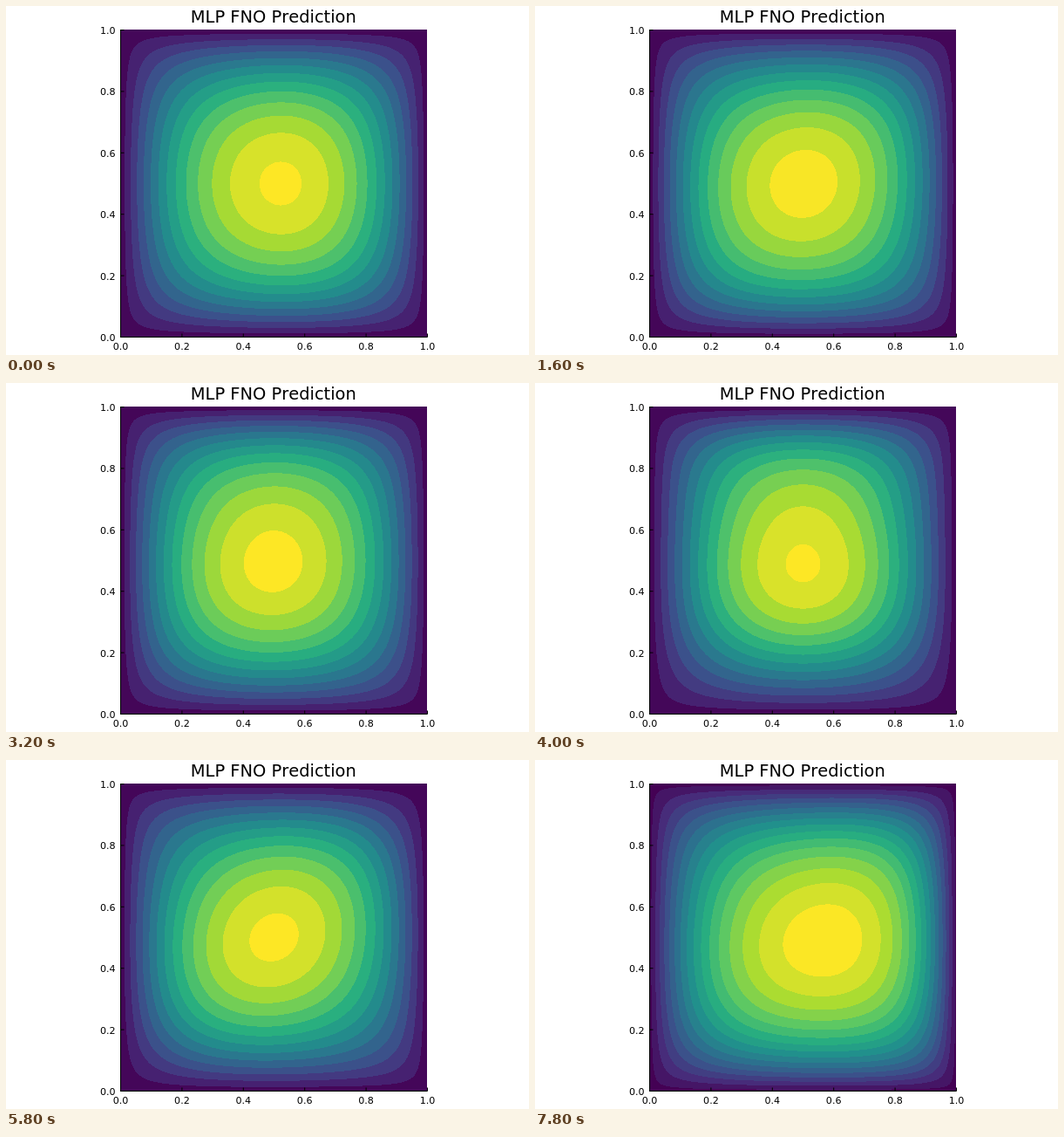
An HTML page with a canvas for the animation above (8000 ms loop, 600 by 400 pixels).

```html
<!DOCTYPE html>
<html lang="en">
<head>
<meta charset="utf-8">
<style>
  html, body { margin: 0; width: 100%; height: 100%; overflow: hidden; background: #fff; }
  canvas { display: block; }
</style>
</head>
<body>
<canvas id="stage" width="600" height="400"></canvas>
<script>
const ctx = document.getElementById('stage').getContext('2d');
const SIZE = 352, HALF = SIZE / 2, LEFT = 131, TOP = 27;
const LOOP = 8000, STEP = 200;

const gradient = ['#440154', '#472d7b', '#3b528b', '#2c728e', '#21918c', '#28ae80', '#5ec962', '#addc30', '#fde725'];

// gap: contour spacing; slope, bend and skew: linear, quadratic and cubic change along an axis;
// tilt: stretch along the diagonal. Anything left out is zero.
const poses = [
  { time: 0, gap: .0771, slopeX: .08, bendX: -.04, skewX: -.06 },
  { time: 800, gap: .0762, slopeX: .04, bendX: -.04, skewX: -.06, tilt: .1 },
  { time: 2400, gap: .0744, slopeX: -.02, bendX: .08, bendY: .05, skewY: -.09, tilt: .1 },
  { time: 4000, gap: .0773, slopeY: -.04, bendX: -.18, bendY: .03, skewY: .38 },
  { time: 5800, gap: .0766, bendX: -.04, bendY: -.08, skewY: .05, tilt: .27 },
  { time: 7000, gap: .0755, slopeX: -.06, slopeY: -.05, bendY: .05, skewX: .05, tilt: -.42 },
  { time: 7800, gap: .0626, slopeX: .16, slopeY: -.05, bendX: .3, bendY: .13, skewX: .08, skewY: .05, tilt: .1 }
];

const coord = i => (i - HALF) / HALF;
const mix = (a, b, t) => a + (b - a) * t;
const cubic = q => q ** 3 * (2 - 1.5 * q * q);
const channels = hex => [1, 3, 5].map(i => parseInt(hex.slice(i, i + 2), 16));

// Solution of Poisson's equation on the square, scaled to about 1 at the centre.
function poissonField() {
  const modes = Array.from({ length: 7 }, (_, n) => 2 * n + 1);
  const across = [], up = [];
  for (let i = 0; i < SIZE; i++) {
    const q = coord(i) * Math.PI / 2;
    across.push(modes.map((k, n) => (-1) ** n * Math.cos(k * q) / k ** 3));
    up.push(modes.map(k => Math.cosh(k * q) / Math.cosh(k * Math.PI / 2)));
  }
  const scale = 1.6968;
  const field = new Float32Array(SIZE * SIZE);
  for (let j = 0, p = 0; j < SIZE; j++) {
    for (let i = 0; i < SIZE; i++, p++) {
      const series = modes.reduce((sum, _, n) => sum + across[i][n] * up[j][n], 0);
      field[p] = Math.max(0, scale * (1 - coord(i) ** 2 - 32 / Math.PI ** 3 * series));
    }
  }
  return field;
}

const base = poissonField();
const image = ctx.createImageData(SIZE, SIZE);
image.data.fill(255);

function colorAt(value) {
  const last = gradient.length - 1;
  const p = Math.min(1, Math.max(0, value)) * last;
  const i = Math.min(last - 1, Math.floor(p));
  const from = channels(gradient[i]), to = channels(gradient[i + 1]);
  return from.map((c, n) => mix(c, to[n], p - i));
}

function poseAt(time) {
  const next = Math.max(1, poses.findIndex(pose => pose.time >= time));
  const a = poses[next - 1], b = poses[next];
  const t = (time - a.time) / (b.time - a.time);
  return name => mix(a[name] || 0, b[name] || 0, t);
}

function profile(pose, axis) {
  const slope = pose('slope' + axis), bend = pose('bend' + axis), skew = pose('skew' + axis);
  return Array.from({ length: SIZE }, (_, i) => {
    const q = axis === 'Y' ? -coord(i) : coord(i);
    return slope * q + bend * q * q + skew * cubic(q);
  });
}

function drawContours(time) {
  const pose = poseAt(time);
  const gap = pose('gap'), tilt = pose('tilt');
  const lowest = 1.9 * gap - .092;
  const colors = Array.from({ length: 24 }, (_, k) => colorAt(lowest + (k - .5) * gap));
  const columns = profile(pose, 'X'), rows = profile(pose, 'Y');
  for (let j = 0, p = 0; j < SIZE; j++) {
    const y = -coord(j);
    for (let i = 0; i < SIZE; i++, p++) {
      const x = coord(i);
      const diagonal = tilt * x * y * (1 - x * x - y * y);
      const value = base[p] * (.995 + columns[i] + rows[j] + diagonal);
      const band = Math.max(0, Math.floor((value - lowest) / gap) + 1);
      image.data.set(colors[band], p * 4);
    }
  }
  ctx.putImageData(image, LEFT, TOP);
}

function drawLine(x1, y1, x2, y2) {
  ctx.beginPath();
  ctx.moveTo(x1, y1);
  ctx.lineTo(x2, y2);
  ctx.stroke();
}

function drawText(text, x, y, size, align = 'center') {
  ctx.font = `${size}px "DejaVu Sans", sans-serif`;
  ctx.textAlign = align;
  ctx.fillText(text, x, y);
}

function drawAxes() {
  const x0 = LEFT + .5, y0 = TOP + SIZE + .5;
  ctx.strokeStyle = ctx.fillStyle = '#000';
  ctx.fontKerning = 'none';
  drawLine(x0, TOP, x0, y0 + .5);
  drawLine(x0, y0, x0 + SIZE, y0);
  for (let i = 0; i <= 5; i++) {
    const label = (i / 5).toFixed(1), offset = i / 5 * SIZE;
    drawLine(x0 + offset, y0, x0 + offset, y0 - 4);
    drawLine(x0, y0 - offset, x0 + 4, y0 - offset);
    drawText(label, x0 + offset, 394, 11.11);
    drawText(label, 125.6, Math.round(y0 - offset + 4.4), 11.11, 'right');
  }
  drawText('MLP FNO Prediction', 306.8, 19, 19.44);
}

let shown = -1;
function render(now) {
  const time = Math.floor(now % LOOP / STEP) * STEP;
  if (time !== shown) {
    shown = time;
    ctx.fillStyle = '#fff';
    ctx.fillRect(0, 0, 600, 400);
    drawContours(time);
    drawAxes();
  }
  requestAnimationFrame(render);
}
render(performance.now());
</script>
</body>
</html>
```
